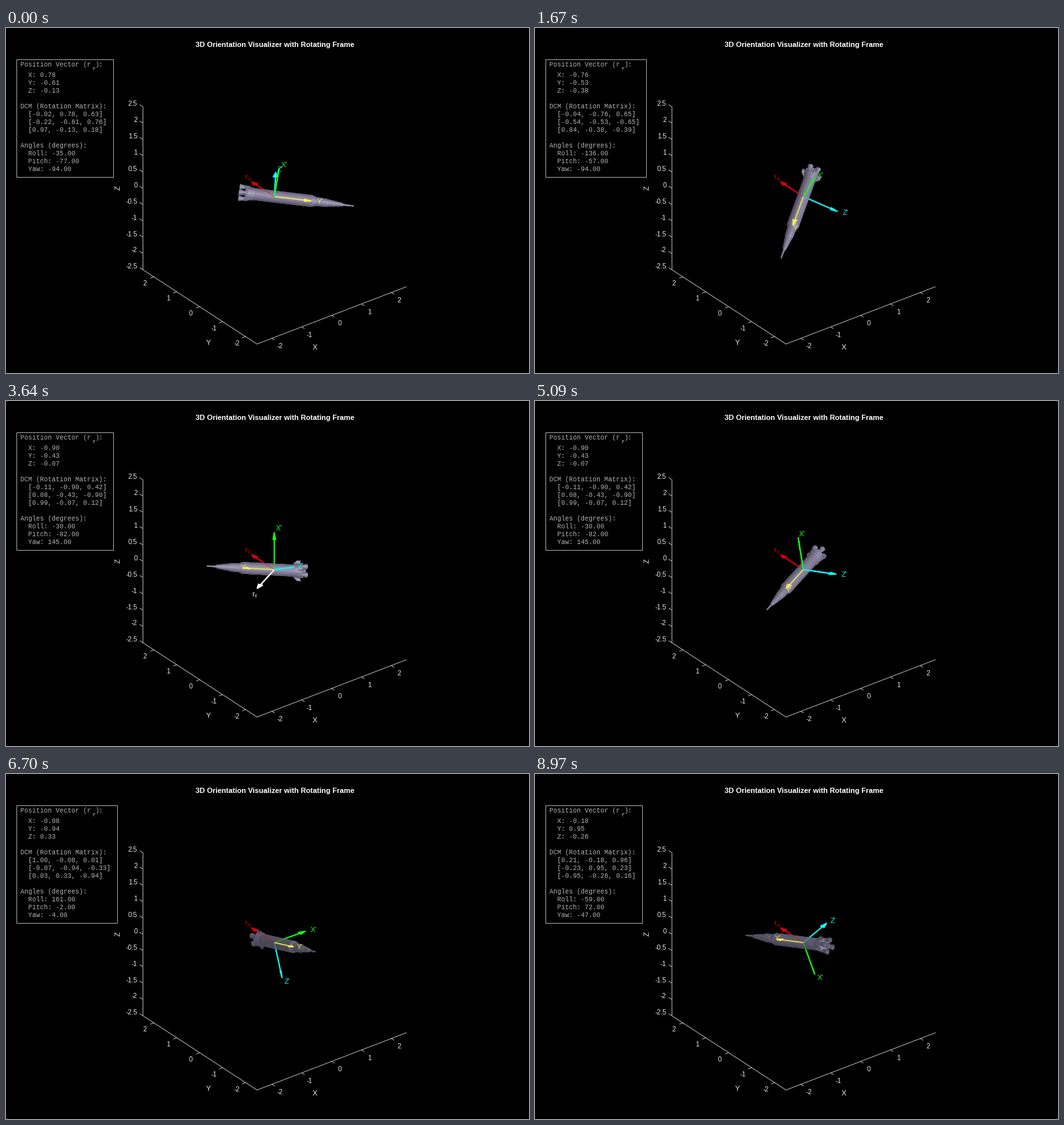
These frames come from a looping animation (800 by 528 pixels, 9 s). A matplotlib script:

```python
import numpy as np
import matplotlib.pyplot as plt
from matplotlib.animation import FuncAnimation
from matplotlib.collections import PolyCollection
from matplotlib.patches import Rectangle

W, H, DPI = 800, 528, 100
STEP, FRAMES = 30, 300
PT = 72 / DPI                       # points per pixel

# roll, pitch, yaw of each attitude, in degrees
TARGETS = [(-35, -77, -94), (-136, -57, -94), (-30, -82, 145),
           (161, -2, -4), (-59, 72, -47)]
CYCLE, LEAD, PAUSE, TURN = 2200, 1360, 250, 510

# orthographic camera
AZ, EL, SCALE = np.radians(-37.5), np.radians(30), 57.6
ORIGIN = np.array([410.5, 258.0])
CAM = np.array([np.sin(AZ) * np.cos(EL), -np.cos(AZ) * np.cos(EL), np.sin(EL)])
PROJ = SCALE * np.array([
    [np.cos(AZ), np.sin(AZ), 0],
    [np.sin(AZ) * np.sin(EL), -np.cos(AZ) * np.sin(EL), -np.cos(EL)]])
LIGHT = np.array([0, -0.85, 0.53])
HALF = (LIGHT + CAM) / np.linalg.norm(LIGHT + CAM)


def project(p):
    return ORIGIN + np.asarray(p, float) @ PROJ.T


def euler(roll, pitch, yaw):
    r, p, y = np.radians([roll, pitch, yaw])
    rx = [[1, 0, 0], [0, np.cos(r), -np.sin(r)], [0, np.sin(r), np.cos(r)]]
    ry = [[np.cos(p), 0, np.sin(p)], [0, 1, 0], [-np.sin(p), 0, np.cos(p)]]
    rz = [[np.cos(y), -np.sin(y), 0], [np.sin(y), np.cos(y), 0], [0, 0, 1]]
    return np.array(rz) @ ry @ rx


def part_turn(m, f):
    """Rotate a fraction f of the way from identity to m."""
    a = np.arccos((np.trace(m) - 1) / 2)
    k = (m - m.T) / (2 * np.sin(a))
    return np.eye(3) + np.sin(f * a) * k + (1 - np.cos(f * a)) * k @ k


def revolve(ys, rs, cx=0.0, cz=0.0, n=20):
    a = np.linspace(0, 2 * np.pi, n + 1)
    ys, rs = np.array(ys)[:, None], np.array(rs)[:, None]
    g = np.stack([cx + rs * np.cos(a), ys + 0 * a, cz + rs * np.sin(a)], -1)
    q = np.stack([g[:-1, :-1], g[1:, :-1], g[1:, 1:], g[:-1, 1:]], 2)
    return q.reshape(-1, 4, 3)


def rocket():
    nose = [(2.12, .010), (1.98, .014), (1.86, .02), (1.8, .045), (1.62, .07),
            (1.45, .09), (1.38, .105), (1.24, .112), (1.1, .118)]
    body = [(y, .157) for y in np.linspace(1.0, -.55, 9)]
    tail = [(-.64, .175), (-.72, .19), (-.78, .185), (-.78, .001)]
    parts = [revolve(*zip(*(nose + body + tail)))]
    for cx, cz in [(0, 0), (.11, .11), (-.11, .11), (.11, -.11), (-.11, -.11)]:
        parts.append(revolve([-.76, -.83, -.94], [.035, .045, .072], cx, cz, 10))
    fin = [(-.57, .15), (-.71, .27), (-.83, .27), (-.78, .15)]
    for a in np.arange(4) * np.pi / 2:
        parts.append(np.array([[(r * np.cos(a), y, r * np.sin(a))
                                for y, r in fin]]))
    return np.concatenate(parts)


MESH = rocket()
NORMALS = np.cross(MESH[:, 2] - MESH[:, 0], MESH[:, 3] - MESH[:, 1])
NORMALS /= np.linalg.norm(NORMALS, axis=1)[:, None] + 1e-12
PAINT = np.array([152, 146, 176]) / 255

plt.rcParams['font.family'] = 'Liberation Sans'
fig = plt.figure(figsize=(W / DPI, H / DPI), dpi=DPI, facecolor='black')
ax = fig.add_axes([0, 0, 1, 1])
ax.set_xlim(0, W)
ax.set_ylim(H, 0)
ax.axis('off')


def put(x, y, s, size=10.3, color='#e6e6e6', ha='center', va='center', **kw):
    return ax.text(x, y, s, fontsize=size * PT, color=color, ha=ha, va=va, **kw)


def seg(a, b):
    ax.plot([a[0], b[0]], [a[1], b[1]], color='#dcdcdc', lw=0.8 * PT)


def draw_axes():
    c = 2.5
    seg(project((-c, c, -c)), project((-c, c, c)))
    seg(project((-c, c, -c)), project((-c, -c, -c)))
    seg(project((-c, -c, -c)), project((c, -c, -c)))
    for v in range(-2, 3):
        p = project((v, -c, -c))
        seg(p, project((v, -c - .11, -c)))
        put(p[0] + 12, p[1] + 12.5, str(v))
        p = project((-c, v, -c))
        seg(p, project((-c - .11, v, -c)))
        put(p[0] - 13.5, p[1] + 10.5, str(v))
    for v in np.arange(-5, 6) / 2:
        p = project((-c, c, v))
        seg(p, project((-c, c + .11, v)))
        put(201, p[1] - 4, f'{v:g}', ha='right')
    put(472, 489, 'X', 11.1)
    put(309.5, 482, 'Y', 11.1)
    put(172, 245, 'Z', 11.1, rotation=90)
    put(411.5, 29.3, '3D Orientation Visualizer with Rotating Frame', 11.1,
        'white', va='baseline', weight='bold')


class Arrow:
    """Shaft and head, once behind the rocket and once in front of it."""

    def __init__(self, color, z):
        self.layers = []
        for order in (2, z):
            shaft, = ax.plot([], [], color=color, lw=2 * PT, zorder=order,
                             solid_capstyle='butt')
            head, = ax.fill([0, 0, 0], [0, 0, 0], fc=color, ec=color,
                            lw=1.4 * PT, zorder=order)
            self.layers.append((shaft, head))

    def set(self, d, alpha):
        spread = 0.2 * 0.33 * np.array([d[1], -d[0], 0])
        head_pts = project([d * 0.8 - spread, d, d * 0.8 + spread])
        shaft_pts = project([d * 0, d * 0.97])
        for shaft, head in self.layers:
            shaft.set_data(*shaft_pts.T)
            head.set_xy(head_pts)
        for artist in self.layers[1]:
            artist.set_alpha(alpha)


class Label:
    def __init__(self, s, color, sub=''):
        self.main = put(0, 0, s, 11, color, 'left', zorder=8)
        self.sub = put(0, 0, sub, 8.5, color, 'left', zorder=8)

    def set(self, p, alpha=1.0):
        self.main.set_position(p)
        self.sub.set_position((p[0] + 4.3, p[1] + 4.2))
        self.main.set_alpha(alpha)
        self.sub.set_alpha(alpha)


RED, WHITE, GREEN, YELLOW, CYAN = ('#d8000c', '#ffffff', '#10ff10',
                                   '#fff84a', '#14f5f5')
draw_axes()
skin = PolyCollection([], lw=0.4 * PT, zorder=3)
ax.add_collection(skin)
fixed = [(Arrow(RED, 4), Label('r', RED, '0')),
         (Arrow(WHITE, 4), Label('r', WHITE, 'f'))]
body_axes = [(Arrow(GREEN, 6), Label("X'", GREEN)),
             (Arrow(YELLOW, 5), Label("Y'", YELLOW)),
             (Arrow(CYAN, 6), Label("Z'", CYAN))]

frame_box = Rectangle((16, 47.5), 147, 180, fc='none', ec='#b8b8b8', lw=0.9 * PT)
ax.add_patch(frame_box)


def mono(x, y, s, size=10):
    return put(x, y + 3, s, size, '#b2b2b2', 'left', 'baseline',
               family='Liberation Mono')


mono(21.5, 56, 'Position Vector (r')
mono(131, 62, 'f', 8.5)
mono(136, 56, '):')
mono(21.5, 120, 'DCM (Rotation Matrix):')
mono(21.5, 180, 'Angles (degrees):')
rows = [mono(33.5, y, '') for y in (72, 84, 96, 132, 144, 156, 192, 204, 216)]


def set_info(target, m):
    lines = [f'{n}: {v:.2f}' for n, v in zip('XYZ', m[:, 1])]
    lines += ['[' + ', '.join(f'{v:.2f}' for v in row) + ']' for row in m]
    lines += [f'{n}: {v:.2f}' for n, v in zip(('Roll', 'Pitch', 'Yaw'), target)]
    for row, s in zip(rows, lines):
        row.set_text(s)
    widest = max(22, 2 + max(map(len, lines)))
    frame_box.set_width(15.5 + 6 * widest)


def set_rocket(m):
    pts = MESH @ m.T
    n = NORMALS @ m.T
    n = n * np.where(n @ CAM < 0, -1, 1)[:, None]
    diffuse = np.clip(n @ LIGHT, 0, 1)
    shine = np.clip(n @ HALF, 0, 1) ** 14
    rgb = PAINT * (0.48 + 0.42 * diffuse)[:, None] + 0.14 * (shine * diffuse)[:, None]
    order = np.argsort(pts.mean(1) @ CAM)
    rgb = np.clip(rgb[order], 0, 1)
    skin.set_verts(project(pts[order]))
    skin.set_facecolor(rgb)
    skin.set_edgecolor(rgb)


def update(i):
    t = i * STEP + LEAD
    target = TARGETS[int(t // CYCLE)]
    goal = euler(*target)
    pose = part_turn(goal, np.clip((t % CYCLE - PAUSE) / TURN, 0, 1))
    set_info(target, goal)
    set_rocket(pose)
    for (arrow, label), d in zip(fixed, (np.array([0., 1, 0]), goal[:, 1])):
        inside = d @ pose[:, 1] > 0.97
        arrow.set(d, 0.15 if inside else 1 if d @ CAM > 0 else 0.3)
        label.set(project(1.3 * d), 0.15 if inside else 1)
    for k, (arrow, label) in enumerate(body_axes):
        d = pose[:, k]
        arrow.set(d, 0.7 if k == 1 else 1 if d @ CAM > 0 else 0.3)
        label.set(project(1.1 * d) + [2, 0], 0.75 if k == 1 else 1)
    return []


anim = FuncAnimation(fig, update, frames=FRAMES, init_func=lambda: update(0),
                     interval=STEP, repeat=True, repeat_delay=0, blit=False)
plt.show()
```
